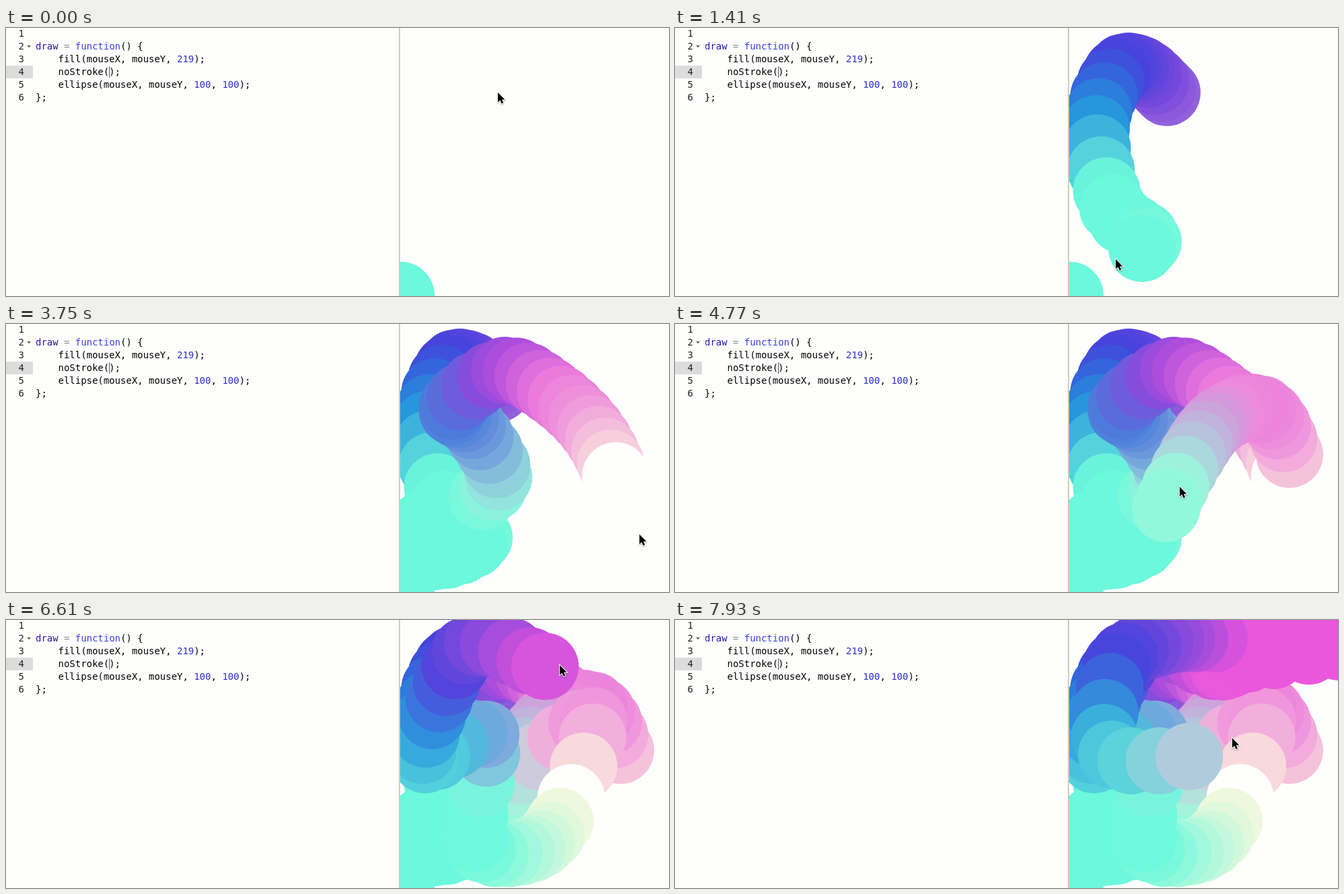
An HTML page with a canvas that plays this animation: 984 by 399 pixels, repeating every 7990 ms.

```html
<!DOCTYPE html>
<html lang="en">
<head>
<meta charset="utf-8">
<title>Mouse painting</title>
<style>
  html, body { margin: 0; width: 984px; height: 399px; overflow: hidden; background: #fefefc; }
  pre, canvas, i { position: absolute; margin: 0; }
  pre { top: -1px; font: 13.95px/19px "DejaVu Sans Mono", monospace; color: #000; }
  #nums { left: 0; width: 27px; text-align: right; color: #222; }
  #code { left: 44px; }
  #row { left: 0; top: 56px; width: 40px; height: 19px; background: #dcdcdc; }
  #fold { left: 31px; top: 26px; border: 3px solid transparent; border-top-color: #555; border-bottom: 0; }
  #caret { left: 153px; top: 57px; width: 1px; height: 17px; background: #555; }
  #edge { left: 583px; top: 0; width: 2px; height: 399px; background: #d6ccb0; }
  canvas { left: 585px; top: 0; }
  .name { color: #2418a8; }
  .key { color: #3c3ce8; }
  .num { color: #2c2cd8; }
  .op { color: #858b94; }
</style>
</head>
<body>
<i id="row"></i>
<pre id="nums">1
2
3
4
5
6</pre>
<i id="fold"></i>
<pre id="code">

<span class="name">draw</span> <span class="op">=</span> <span class="key">function</span>() {
    fill(mouseX, mouseY, <span class="num">219</span>);
    noStroke();
    ellipse(mouseX, mouseY, <span class="num">100</span>, <span class="num">100</span>);
};</pre>
<i id="caret"></i>
<i id="edge"></i>
<canvas width="399" height="399"></canvas>
<script>
const LOOP = 7990, START = 420, STEP = 70.75, LAST = 107;
const RATE = 1.5;   // dots painted per step
const LEAD = 2;     // dots the pointer is ahead
const SPAN = 4;     // dots between key points
const LEFT = 585;

// Key points of the mouse gesture, evenly spaced in time
const keys = [
  [730, 96], [692, 62], [656, 66], [625, 150], [650, 268], [702, 318],
  [638, 346], [610, 305], [670, 280], [731, 228], [692, 151], [663, 122],
  [740, 69], [808, 100], [868, 156], [905, 226], [925, 310], [935, 350],
  [942, 325], [912, 194], [872, 127], [810, 142], [768, 195], [728, 275],
  [765, 225], [872, 150], [822, 300], [765, 345], [695, 325], [712, 170],
  [622, 208], [643, 117], [700, 34], [800, 69], [850, 58], [1000, 35],
  [800, 28], [720, 34], [655, 70], [648, 200], [800, 193], [880, 110]
];

const clamp = (v, lo, hi) => Math.max(lo, Math.min(hi, v));

const spline = (a, b, c, d, t) =>
  b + t / 2 * (c - a + t * (2 * a - 5 * b + 4 * c - d + t * (3 * (b - c) + d - a)));

// Mouse position, inside the canvas, at dot number n
function mouse(n) {
  const k = Math.floor(n / SPAN), t = n / SPAN - k;
  const near = [k - 1, k, k + 1, k + 2].map(i => keys[clamp(i, 0, keys.length - 1)]);
  const [x, y] = [0, 1].map(axis => spline(...near.map(p => p[axis]), t));
  return [x - LEFT, y];
}

// fill(x, y, 219) as a wide-gamut display shows it
function dotColor(x, y) {
  let r = clamp(x, 0, 255), g = clamp(y, 0, 255);
  if (r > 249 && g > 222) return "#fefefc";
  const low = Math.min(107, 40 + Math.max(0, g - 150) * 0.72);
  const high = 234 + Math.max(0, g - 110) * 0.13;
  const lift = Math.max(0, r - 140) * Math.max(0, 1 - g / 150) * 0.4;
  g = clamp(g + lift, 60 + r * 0.1, 248);
  r = clamp(r, low, high);
  return `rgb(${Math.round(r)},${Math.round(g)},220)`;
}

const ctx = document.querySelector("canvas").getContext("2d");
const arrow = new Path2D("M0 0V14.5L3.3 11.5L5.6 16.6L8.2 15.5L6 10.6H10.4Z");

function dot(x, y) {
  ctx.fillStyle = dotColor(x, y);
  ctx.beginPath();
  ctx.arc(x, y, 50, 0, 2 * Math.PI);
  ctx.fill();
}

function pointer(x, y) {
  ctx.save();
  ctx.translate(x, y);
  ctx.shadowColor = "rgba(0,0,0,.35)";
  ctx.shadowBlur = 2;
  ctx.shadowOffsetY = 1;
  ctx.strokeStyle = "#fff";
  ctx.lineWidth = 2;
  ctx.stroke(arrow);
  ctx.shadowColor = "transparent";
  ctx.fillStyle = "#000";
  ctx.fill(arrow);
  ctx.restore();
}

function draw() {
  const t = performance.now() % LOOP;
  const step = t < START ? 0 : Math.min(LAST, Math.floor((t - START) / STEP + 1.6));
  const last = (step - 1) * RATE;

  ctx.clearRect(0, 0, 399, 399);
  dot(1, 398);
  for (let n = 0; n <= last; n++) dot(...mouse(n));
  pointer(...mouse(step ? last + LEAD : 0));
  requestAnimationFrame(draw);
}
draw();
</script>
</body>
</html>
```
